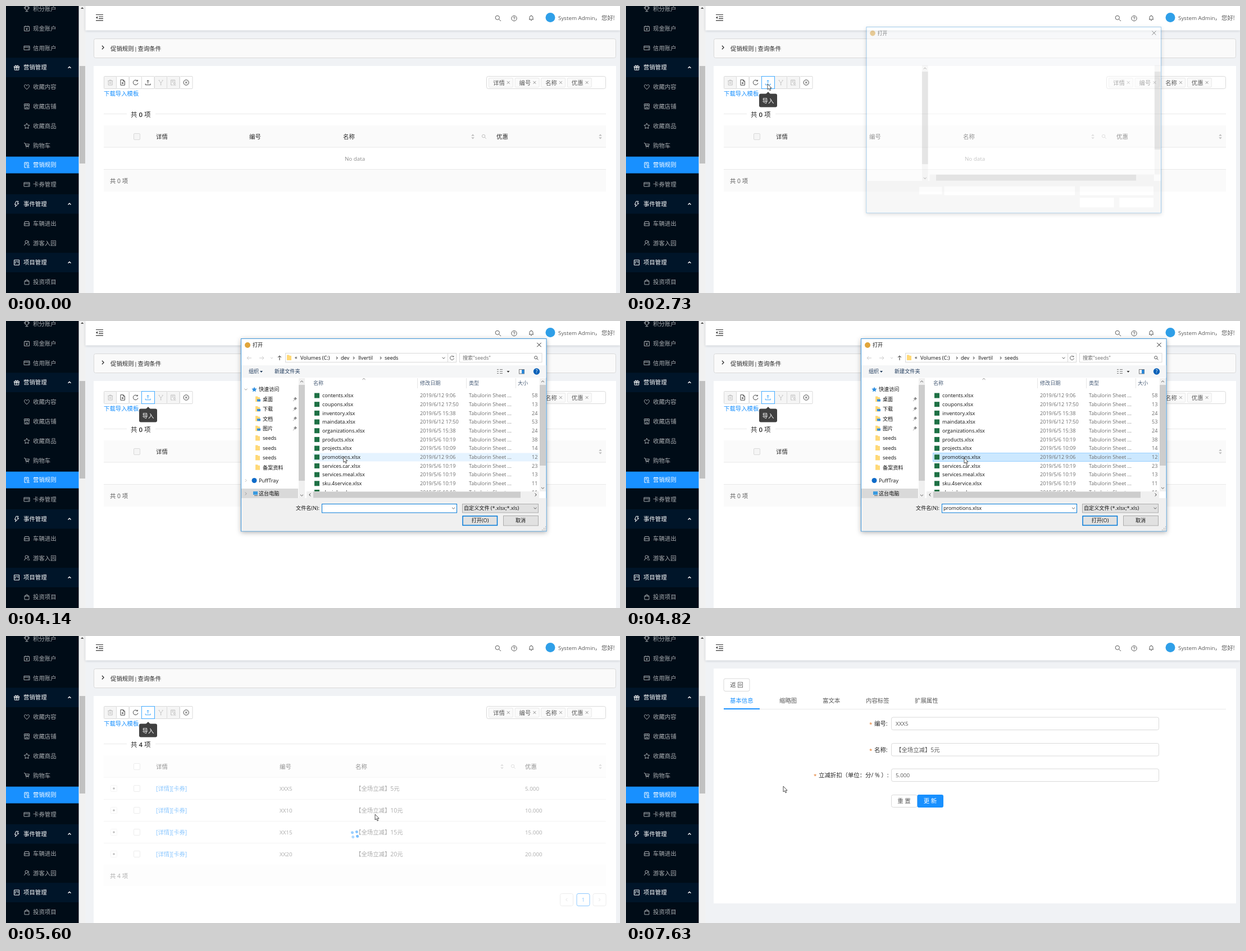
An HTML page for the animation above (8 s loop, 1093 px wide and 512 px high).

```html
<!DOCTYPE html>
<html lang="zh-CN">
<head>
<meta charset="utf-8">
<title>Rule import</title>
<style>
html, body { margin: 0; width: 100%; height: 100%; overflow: hidden; background: #f0f2f5 }
svg { display: block; width: 1093px; height: 512px }
text { font-family: "Open Sans", "Noto Sans CJK SC", "Noto Sans CJK JP", sans-serif; white-space: pre }
</style>
</head>
<body>
<svg id="stage" viewBox="0 0 1093 512"></svg>
<script>
const INK = '#595959', DARK = '#262626', LINE = '#d9d9d9', SOFT = '#e8e8e8', BLUE = '#1890ff', PALE = '#fafafa', DIM = '#bfbfbf';

const icons = {
  trophy: 'M-2.5-4.5h5v4a2.5 2.5 0 0 1-5 0zM-2.5-3h-2v1q0 2 2 2M2.5-3h2v1q0 2-2 2M0 2v2.5M-2.5 4.5h5',
  cash: 'M-4.5-3.5h9v8h-9zM-2-5v2M2-5v2M-2-1.5L0 .5 2-1.5M0 .5V3M-1.5 1.5h3',
  card: 'M-5-3.5H5v7H-5zM-5-1.2H5M2 1.5h1.5',
  gift: 'M-4.5-2h9v2.3h-9zM-3.8.3h7.6v4.2h-7.6zM0-2v6.5M0-2C-4-2-2.5-6 0-2 2.5-6 4-2 0-2',
  heart: 'M0 4.2C-6.5-.5-4.5-4-2.5-4-1-4 0-3 0-2 0-3 1-4 2.5-4 4.5-4 6.5-.5 0 4.2z',
  shop: 'M-4.5-4.5h9v3h-9zM-4-1.5v6h8v-6M-1.5 4.5v-3h3v3M-1.5-4.5v3M1.5-4.5v3',
  star: 'M0-4.8L1.5-1.6 4.9-1.2 2.4 1.2 3 4.6 0 3-3 4.6-2.4 1.2-4.9-1.2-1.5-1.6z',
  cart: 'M-5-4.2h2l1.5 6h5.5M-2.7-2.5h7.2l-1 3h-5.5M-1.5 4h1M2.5 4h1',
  audit: 'M3-1v-3.5h-7v9h3M-2.3-2.5h3.5M-2.3-.5h2M.7 1.3a1.5 1.5 0 1 1 3 0a1.5 1.5 0 1 1-3 0M-.2 4.5h5',
  bolt: 'M-1-4.8h4L1-1.2h3L-2.5 4.8-1 1h-2.5z',
  car: 'M-4.5 4V0l1-3.5h7l1 3.5v4zM-4.5 0h9M-3 2h1.2M2 2h1.2',
  team: 'M-3-2a2.5 2.5 0 1 1 5 0a2.5 2.5 0 1 1-5 0M-4.5 4.5q.5-4 4-4M2.5-4q2 1.5 0 4 2 1 2.3 4.2M1 2l2 2.5',
  project: 'M-4.5-4.5h9v9h-9zM-2.3-2.5v4.5M0-2.5v2M2.3-2.5v3',
  bag: 'M-4-2h8v6.5h-8zM-2-.3v-2.2a2 2 0 0 1 4 0v2.2',
  remove: 'M-4.5-3h9M-1.5-3v-1.5h3v1.5M-3.5-3v7.5h7v-7.5M-1-1v3.5M1-1v3.5',
  add: 'M-3.7-4.8h4.7l2.7 2.5v7h-7.4zM1-4.8v2.5h2.7M0-.8v3.6M-1.8 1h3.6',
  reload: 'M3.3-2.8A4.3 4.3 0 1 0 4.2.8M3.6-4.8v2.2H1.3',
  upload: 'M0 2v-6M-2-2.2L0-4.2 2-2.2M-4.5 2v2.2h9V2',
  fork: 'M-3-3L0 .5 3-3M0 .5v3M-4-4h2M2-4h2M-1 4.3h2',
  cancel: 'M-4.7 0a4.7 4.7 0 1 1 9.4 0a4.7 4.7 0 1 1-9.4 0M-1.8-1.8l3.6 3.6M1.8-1.8l-3.6 3.6',
  search: 'M-4.8-1.2a3.6 3.6 0 1 1 7.2 0a3.6 3.6 0 1 1-7.2 0M1.5 1.5L5 5',
  help: 'M-4.7 0a4.7 4.7 0 1 1 9.4 0a4.7 4.7 0 1 1-9.4 0M-1.4-1.1A1.4 1.4 0 1 1 0 .3v1M0 2.2v.9',
  bell: 'M-4 3h8M-3 3V-.5a3 3 0 0 1 6 0V3M0-3.5v-1M-1 4.7h2',
  cross: 'M-2.3-2.3l4.6 4.6M2.3-2.3l-4.6 4.6',
  plus: 'M-2 0h4M0-2v4',
  up: 'M-2.5 1.2L0-1.2 2.5 1.2', down: 'M-2.5-1.2L0 1.2 2.5-1.2',
  right: 'M-1.2-2.5L1.2 0-1.2 2.5', left: 'M1.2-2.5L-1.2 0 1.2 2.5',
  back: 'M4 0h-8M-1-3l-3 3 3 3', ahead: 'M-4 0h8M1-3l3 3-3 3', rise: 'M0 4v-8M-3-1l3-3 3 3'
};

const rect = (x, y, w, h, fill, line = 'none', r = 0, more = '') =>
  `<rect x="${x}" y="${y}" width="${w}" height="${h}" rx="${r}" fill="${fill}" stroke="${line}" ${more}/>`;
const path = (d, line = 'none', fill = 'none', w = 1) => `<path d="${d}" stroke="${line}" fill="${fill}" stroke-width="${w}"/>`;
const icon = (name, x, y, color = INK, k = 1, w = 1) =>
  `<path transform="translate(${x} ${y}) scale(${k})" d="${icons[name]}" fill="none" stroke="${color}" stroke-width="${w / k}"/>`;
// Plain Latin runs are set a little smaller to sit level with the CJK glyphs.
const text = (x, cy, s, color = INK, anchor = 'start', size = /^[\x00-\x7f]*$/.test(s) ? 9.8 : 10.4) =>
  `<text x="${x}" y="${cy + size * .36}" font-size="${size}" fill="${color}" text-anchor="${anchor}">${s}</text>`;
const small = (x, cy, s, color = '#111', anchor = 'start') => text(x, cy, s, color, anchor, 9.1);
const dot = (x, y, r, fill) => `<circle cx="${x}" cy="${y}" r="${r}" fill="${fill}"/>`;
const group = (id, ...parts) => `<g id="${id}">${parts.join('')}</g>`;
const hline = (x1, x2, y, color = SOFT) => path(`M${x1} ${y}H${x2}`, color);

function sidebar() {
  const items = 'trophy 积分账户,cash 现金账户,card 信用账户,gift #营销管理,heart 收藏内容,shop 收藏店铺,star 收藏商品,cart 购物车,audit 营销规则,card 卡券管理,bolt #事件管理,car 车辆进出,team 游客入园,project #项目管理,bag 投资项目';
  let out = rect(0, 0, 130, 512, '#000c17');
  items.split(',').forEach((item, i) => {
    const [name, label] = item.split(' '), y = 5.2 + 34.8 * i;
    if (label[0] == '#')
      out += rect(0, y - 17.4, 130, 34.8, '#001529') + icon(name, 19, y, '#fff') + text(31, y, label.slice(1), '#fff') + icon('up', 113, y, '#fff', 1, 1.4);
    else {
      const on = i == 8, color = on ? '#fff' : '#a6aaae';
      out += (on ? rect(0, y - 14.9, 130, 29.8, BLUE) : '') + icon(name, 37, y, color) + text(48, y, label, color);
    }
  });
  return out + rect(129.5, 0, 12, 512, '#f1f1f1') + rect(131, 107, 10, 174, '#c1c1c1') + path('M133 5l2.7-3 2.7 3z', 'none', '#505050');
}

function header() {
  return rect(141.5, 0, 952, 43.5, '#fff', 'none', 0, 'style="filter:drop-shadow(0 1px 2px rgba(0,21,41,.16))"') +
    path('M160 15.5h13M165 19h8M165 22.3h8M160 25.8h13', '#333', 'none', 1.2) + path('M163 18.3v4.8l-3-2.4z', 'none', '#333') +
    icon('search', 876, 22) + icon('help', 904.5, 22) + icon('bell', 935, 21) + dot(969, 20.5, 8.5, '#2f9fe8') +
    text(983, 21, 'System Admin') + text(1048, 21, '，') + text(1060, 21, '您好!');
}

const buttonX = i => Math.floor(174 + 22.5 * i) + .5;
function toolbar() {
  const names = ['remove', 'add', 'reload', 'upload', 'fork', 'audit', 'cancel'];
  let out = '';
  names.forEach((name, i) => {
    const x = buttonX(i), off = [0, 4, 5].includes(i);
    out += rect(x, 125.5, 22.5, 22, off ? '#f5f5f5' : '#fff', LINE, 1) + icon(name, x + 11.2, 136.5, off ? DIM : '#444');
  });
  out += group('focus', rect(buttonX(3), 125.5, 23, 22, '#fff', '#40a9ff'), icon('upload', buttonX(3) + 11.2, 136.5, '#40a9ff')) +
    rect(buttonX(3), 125.5, 23, 22, 'none', BLUE, 2, 'id="ring"') + text(174, 156, '下载导入模板', BLUE) +
    rect(855.5, 125.5, 212, 22, '#fff', LINE, 3);
  ['详情', '编号', '名称', '优惠'].forEach((s, i) => {
    const x = 859.5 + 46.6 * i;
    out += rect(x, 128.5, 43, 16.5, PALE, SOFT, 1.5) + text(x + 7.5, 137, s) + icon('cross', x + 34.8, 136.5, '#8c8c8c');
  });
  return out;
}

const box = (y, fill = '#fff') => rect(227.5, y - 5.5, 11, 11, fill, LINE, 1.5);
function tableHead(xs, sorter, fill) {
  const sort = x => `<path transform="translate(${x} 233)" d="M-2.8-1.2L0-4.4 2.8-1.2zM-2.8 1.2L0 4.4 2.8 1.2z" fill="${DIM}"/>`;
  return rect(174, 213, 894, 39, PALE) + hline(174, 1068, 252) + box(233, fill) +
    ['详情', '编号', '名称', '优惠'].map((s, i) => text(xs[i], 233, s, DARK)).join('') +
    sort(sorter) + sort(1058) + icon('search', sorter + 20, 233, DIM, .75);
}
function dataRows() {
  let out = '';
  ['XXX5', 'XX10', 'XX15', 'XX20'].forEach((code, i) => {
    const y = 272 + 39 * i, n = 5 * (i + 1);
    out += rect(186.5, y - 5.5, 11, 11, '#fff', SOFT, 1) + icon('plus', 192, y) + box(y) + text(267, y, '[详情][卡券]', BLUE) +
      text(487, y, code) + text(622, y, `【全场立减】${n}元`) + text(924, y, n + '.000') + hline(174, 1068, y + 19.5);
  });
  const page = (x, line, inner) => rect(x, 459.5, 23, 22, '#fff', line, 3) + inner;
  return out + rect(174, 408, 894, 38, PALE) + text(185, 428, '共 4 项') +
    page(986.5, LINE, icon('left', 998, 470.5, DIM)) + page(1016, BLUE, text(1027.5, 470.5, '1', BLUE, 'middle')) + page(1045, LINE, icon('right', 1056.5, 470.5, DIM));
}

function listPage() {
  return rect(156.5, 58.5, 929, 34, PALE, LINE, 3) + icon('right', 172.5, 74, DARK, 1.3, 1.2) +
    text(186, 76, '促销规则', DARK) + text(231, 76, '|', DARK, 'middle') + text(234.5, 76, '查询条件', DARK) +
    rect(156, 107, 930, 405, '#fff') + toolbar() + hline(174, 215, 192.5) + hline(266, 1068, 192.5) +
    `<text x="222" y="197.5" font-size="11.5" fill="${DARK}">共 <tspan id="count" font-weight="600">0</tspan> 项</text>` +
    group('table',
      group('empty', tableHead([267, 433, 600, 873], 831, '#f5f5f5'), text(621, 272, 'No data', '#8c8c8c', 'middle'), hline(174, 1068, 291.5),
        rect(174, 292, 894, 39, PALE), text(185, 312, '共 0 项')),
      group('data', tableHead([267, 487, 622, 924], 883), rect(174, 252.5, 894, 39, '#e6f7ff', 'none', 0, 'id="hover"'), dataRows())) +
    group('spin', [[-4, -4], [4, -4], [4, 4], [-4, 4]].map(([x, y], i) => `<g opacity="${.35 + i * .08}">${dot(x, y, 2.5, BLUE)}</g>`).join('')) +
    group('tip', rect(237, 156.5, 32, 24, '#404040', 'none', 3), path('M249 157l4-4 4 4z', 'none', '#404040'), text(253, 169, '导入', '#fff', 'middle'));
}

function detailPage() {
  const tabs = { 185: '基本信息', 273: '缩略图', 350: '富文本', 427: '内容标签', 514: '扩展属性' };
  const field = (y, x, label) => text(x - 9, y + 1, '*', '#e0701c') + text(x, y, label, DARK) + rect(472.5, y - 11.5, 476, 22.5, '#fff', LINE, 3);
  return rect(156, 58, 930, 419, '#fff') + rect(174, 76, 46, 22.5, '#fff', LINE, 3) + text(197, 87.5, '返 回', INK, 'middle') +
    Object.keys(tabs).map(x => text(x, 115.5, tabs[x], x == 185 ? BLUE : INK)).join('') + hline(174, 1068, 130.5) + rect(174, 129, 64, 2, BLUE) +
    field(156.5, 442, '编号:') + field(203, 442, '名称:') + field(248.5, 343, '立减折扣（单位：分/ % ）:') +
    group('values', text(480, 156.5, 'XXX5'), text(480, 203, '【全场立减】5元'), text(480, 248.5, '5.000')) +
    rect(472.5, 283.5, 46, 22, '#fff', LINE, 3) + text(495, 294.5, '重 置', INK, 'middle') +
    rect(518.5, 283, 46.5, 23, BLUE, 'none', 3) + text(541.5, 294.5, '更 新', '#fff', 'middle');
}

const ROW = 15.68, GREY = '#6d6d6d';
const folder = (x, y) => path(`M${x - 4} ${y - 5}h4l1 1.5h3v8h-8z`, 'none', '#ffd978');

// The window opens with blank white controls; the body fills them in.
function dialogFrame() {
  return rect(418.5, 31.5, 543.5, 343.5, '#fff', '#3f97dc', 0, 'style="filter:drop-shadow(0 2px 4px rgba(0,0,0,.3))"') +
    dot(430, 43, 5, '#e0a53c') + small(439, 43, '打开') + icon('cross', 949, 42.5, '#222', 1.6) +
    rect(521, 102, 11, 214, '#f0f0f0') + rect(521, 114, 11, 171, '#cdcdcd') + icon('up', 526.5, 108) + icon('down', 526.5, 311) +
    rect(950, 102, 11, 202, '#f0f0f0') + rect(950, 114, 11, 144, '#cdcdcd') +
    rect(535, 304, 414, 12, '#f0f0f0') + rect(547, 304.5, 369, 11, '#cdcdcd') +
    rect(419, 316, 542.5, 58.5, '#f0f0f0') + rect(516, 327, 42, 14, '#fff') + rect(562, 326, 241, 16.5, '#fff') + rect(812, 326, 136, 16.5, '#fff') +
    rect(812, 347, 63, 18, '#fff') + rect(885, 347, 63, 18, '#fff');
}

function dialogBody() {
  let out = icon('back', 433, 66, '#ccc') + icon('ahead', 455, 66, '#ccc') + icon('down', 473, 66, '#ccc', .8) + icon('rise', 487, 66, '#333') +
    rect(497.5, 57.5, 304, 16, '#fff', LINE) + rect(807.5, 57.5, 146.5, 16, '#fff', LINE) + folder(504, 65.5) + small(514, 65, '«') +
    small(524, 65.5, 'Volumes (C:)') + small(596, 65.5, 'dev') + small(627, 65.5, 'Ilvertil') + small(674, 65.5, 'seeds') +
    [589, 619, 667].map(x => icon('right', x, 66, '#333', .9)).join('') + icon('down', 779, 66) + path('M786.5 58v15', LINE) + icon('reload', 794, 66, INK, .8) +
    small(813, 65.5, '搜索"seeds"', GREY) + icon('search', 944, 66, INK, .7) +
    rect(419, 79, 542.5, 22, '#f5f6f7') + small(432, 90, '组织', '#1e395b') + path('M452 89h5l-2.5 3z', 'none', '#1e395b') + small(478, 90, '新建文件夹', '#1e395b') +
    path('M874 86.5h3M879 86.5h5M874 90h3M879 90h5M874 93.5h3M879 93.5h5', '#777') + path('M891.5 89h5l-2.5 3z', 'none', '#333') +
    rect(913.5, 86.5, 9, 7.5, '#fff', '#777') + rect(918, 87, 4.5, 7, '#2b88d8') + dot(944.5, 90, 5.7, '#0b61b8') + text(944.5, 90, '?', '#fff', 'middle', 8.5);

  out += rect(419, 299, 101, 17, '#d9d9d9') + `<g transform="translate(442 122) scale(.95)">${path(icons.star, 'none', '#2f8fe0')}</g>` + small(450, 122, '快速访问');
  ['桌面', '下载', '文档', '图片', 'seeds', 'seeds', 'seeds', '备案资料'].forEach((s, i) => {
    const y = 139.5 + 17.4 * i;
    out += folder(448, y) + small(457, y, s);
    if (i < 4) out += rect(447, y, 6, 4, '#3b8fd6') + path(`M511 ${y + 3.5}l2.5-2.5M512 ${y - 1}l3 3M513 ${y - 1}l2-2.5 2.5 2.5-2.5 2z`, '#888', '#888', .8);
  });
  out += dot(442, 284.5, 4.5, '#0f6cc9') + small(450, 284.5, 'PuffTray') + rect(440, 304, 8, 6, '#3b9be0') + path('M442 311.5h6', '#666') + small(450, 308, '这台电脑') +
    group('twist', icon('down', 427, 122, '#999'), icon('right', 427, 284.5, DIM), icon('right', 427, 308, '#999'));

  out += icon('up', 637, 103.5, '#888') + [732.5, 819.5, 907.5].map(x => path(`M${x} 102v18`, '#e5e5e5')).join('') +
    small(547, 111, '名称', '#4c607a') + small(737, 111, '修改日期', '#4c607a') + small(824, 111, '类型', '#4c607a') + small(911, 111, '大小', '#4c607a') +
    icon('up', 955.5, 108) + icon('down', 955.5, 298) + icon('left', 541, 310, '#333') + icon('right', 943, 310, '#333');
  const files = ['contents,6/12 9:06,58', 'coupons,6/12 17:50,13', 'inventory,6/5 15:38,24', 'maindata,6/12 17:50,53', 'organizations,6/5 15:38,24', 'products,5/6 10:19,38',
    'projects,5/6 10:09,14', 'promotions,6/12 9:06,12', 'services.car,5/6 10:19,23', 'services.meal,5/6 10:19,13', 'sku.4service,5/6 10:19,11', 'sku.jobs,5/6 10:19,11'];
  out += '<g clip-path="url(#pane)">' + rect(546.5, 0, 402, 15, '#e5f3ff', 'none', 0, 'id="pick"');
  files.forEach((file, i) => {
    const [name, date, size] = file.split(','), y = 133 + ROW * i;
    out += rect(549, y - 4.5, 9, 9, '#1e7145') + small(563, y, name + '.xlsx') + small(737, y, '2019/' + date, GREY) +
      small(824, y, 'Tabulorin Sheet ...', GREY) + small(936, y, size + ' KB', GREY);
  });
  return out + '</g>' + rect(516, 327, 42, 14, '#f0f0f0') + rect(562.5, 326.5, 240, 15.5, '#fff', '#0078d7') + rect(812.5, 326.5, 135, 15.5, '#e1e1e1', '#adadad') +
    rect(813, 348, 61.5, 16.5, '#e1e1e1', '#0078d7', 0, 'id="open" stroke-width="1.5"') + rect(885.5, 347.5, 62, 17.5, '#e1e1e1', '#adadad') +
    small(558, 334, '文件名(N):', '#111', 'end') + group('fname', small(565, 334, 'promotions.xlsx')) + icon('down', 796.5, 334) +
    small(815, 334, '自定义文件 (*.xlsx;*.xls)') + icon('down', 942, 334) + small(844, 356, '打开(O)', '#111', 'middle') + small(916, 356, '取消', '#111', 'middle') +
    path('M954 373h1.5M957 373h1.5M957 370h1.5M960 373h1M960 370h1M960 367h1', '#aaa', 'none', 1.5);
}

const $ = id => document.getElementById(id);
$('stage').innerHTML = '<clipPath id="pane"><path d="M533 120h416v184h-416z"/></clipPath>' + rect(0, 0, 1093, 512, '#f0f2f5') + sidebar() + header() +
  group('list', listPage()) + group('detail', detailPage()) + group('dialog', dialogFrame(), group('body', dialogBody())) +
  group('cursor',
    group('arrow', path('M0 0V10L2.3 8 4 11.8 5.7 11 4.1 7.4H7z', '#222', '#fff', .8)),
    group('hand', path('M-1.2 1Q0-1 1.2 1V5L5 6Q6.6 6.5 6 9L5 13H-.5L-3.8 8.6Q-4 6.6-1.2 8z', '#222', '#fff', .9)));

const bursts = [[0, 0, 1], [540, 1310, 11], [1390, 2190, 11], [2340, 2500, 3], [2730, 3500, 11], [3580, 4360, 11], [4440, 5200, 11],
  [5300, 6060, 11], [6150, 6150, 1], [6380, 6380, 1], [6530, 7230, 10], [7470, 7630, 3]];
function stepped(t) {
  const [a, b, n] = bursts.filter(s => s[0] <= t).pop(), step = (b - a) / (n - 1) || 1e9;
  return a + Math.min(n - 1, Math.floor((t - a + 8) / step)) * (n > 1 ? step : 0);
}

const route = [[540, 955, 497], [1310, 351, 195], [1390, 346, 192], [2040, 252, 139], [2730, 252, 139], [3430, 528, 186], [3500, 562, 184], [4200, 602, 244],
  [4820, 602, 244], [5180, 843, 356], [5300, 843, 356], [5604, 657, 318], [6060, 565, 290.5], [6380, 562, 290.5], [6500, 562, 290.5], [6920, 293, 273], [7230, 280, 268], [8000, 280, 268]];
function pointer(t) {
  const i = Math.max(1, route.findIndex(p => p[0] >= t)), [t0, x0, y0] = route[i - 1], [t1, x1, y1] = route[i];
  const u = clamp((t - t0) / (t1 - t0)), e = u * u * (3 - 2 * u);
  return [x0 + (x1 - x0) * e, y0 + (y1 - y0) * e];
}

const clamp = v => Math.min(1, Math.max(0, v));
const show = (id, on) => $(id).style.display = on ? '' : 'none';
const set = (id, values) => { for (const key in values) $(id).setAttribute(key, values[key]); };

function draw(now) {
  const t = stepped(now % 8000), [x, y] = pointer(t);
  const loaded = t >= 5440, loading = t > 5350 && t < 5800, leaving = t >= 7470;

  show('list', !leaving);
  show('detail', leaving);
  show('values', t >= 7540);
  show('empty', !loaded);
  show('data', loaded);
  $('count').textContent = loaded ? 4 : 0;
  set('table', { opacity: loading ? .5 : 1 });
  show('spin', loading);
  set('spin', { transform: `translate(621 354) rotate(${t * .3 + 20})` });
  show('hover', loaded && !loading);
  set('hover', { y: 252.5 + 39 * Math.floor((y - 252) / 39) });

  show('focus', t >= 1880);
  set('tip', { opacity: t < 5900 ? clamp((t - 1960) / 150) : 0 });
  const wave = (t - 2340) / 240, grow = 3 * wave;
  show('ring', wave >= 0 && wave < 1);
  set('ring', { x: buttonX(3) - grow, y: 125.5 - grow, width: 23 + 2 * grow, height: 22 + 2 * grow, opacity: .5 * (1 - wave) });

  const open = t < 5290 ? clamp((t - 2730) / 150) : 0, k = .965 + .035 * open;
  show('dialog', t >= 2730 && t < 5350);
  set('dialog', { opacity: .5 + .5 * open, transform: `translate(690 203) scale(${k}) translate(-690 -203)` });
  show('body', t >= 2870);
  show('twist', t < 4440);
  const chosen = t >= 4270, row = chosen ? 7 : Math.floor((y - 125.2) / ROW);
  show('pick', chosen || t >= 3490);
  set('pick', { y: 125.7 + ROW * row, fill: chosen ? '#cce8ff' : '#e5f3ff', stroke: chosen ? '#99d1ff' : 'none' });
  show('fname', chosen);
  set('open', { fill: x > 813 && y > 347 ? '#e5f1fb' : '#e1e1e1' });

  const overLink = loaded && !leaving && x > 267 && x < 321 && y < 280;
  show('cursor', t >= 540);
  set('cursor', { transform: `translate(${x} ${y})` });
  show('arrow', !overLink);
  show('hand', overLink);
  requestAnimationFrame(draw);
}
requestAnimationFrame(draw);
</script>
</body>
</html>
```
